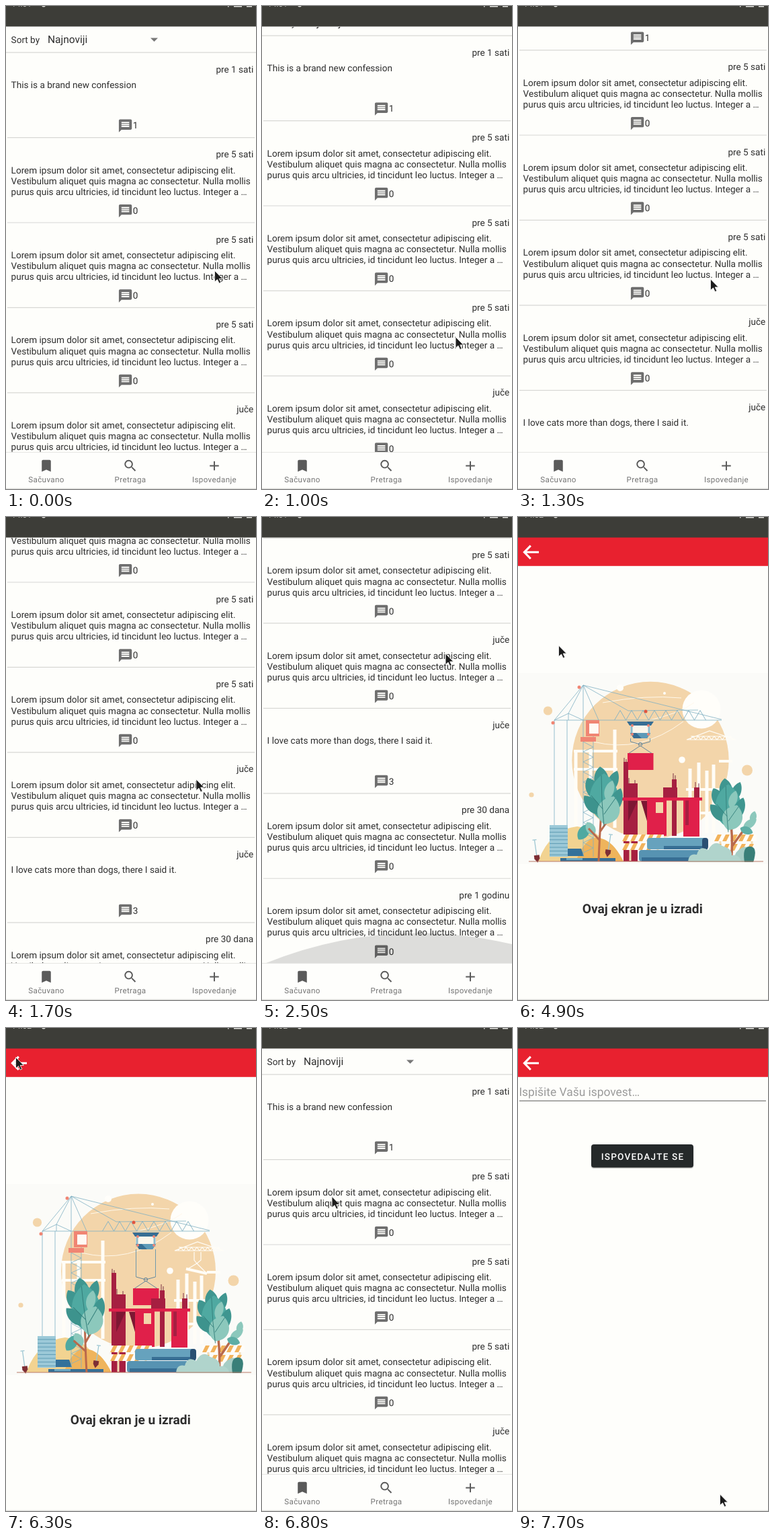
These frames come from a looping animation (372x718 px, 8000 ms). An HTML page:

```html
<!DOCTYPE html>
<html lang="sr">
<head>
<meta charset="utf-8">
<title>Ispovesti</title>
<style>
  html, body { margin: 0; width: 100%; height: 100%; overflow: hidden; background: #fefefb; }
  svg { display: block; width: 100vw; height: 100vh; }
  text { font-family: Roboto, sans-serif; font-size: 13.57px; fill: #2e2e2e; text-rendering: geometricPrecision; }
  .nav text { font-size: 11.58px; letter-spacing: .39px; fill: #747474; }
</style>
</head>
<body>
<svg id="stage" viewBox="0 0 372 718" xmlns="http://www.w3.org/2000/svg"></svg>
<script>
const LOOP = 8000, STEP = 100, PITCH = 126.45;

// ---------- drawing helpers ----------
const rect = (x, y, w, h, fill, more = '') =>
  `<rect x="${x}" y="${y}" width="${w}" height="${h}" fill="${fill}" ${more}/>`;
const disc = (x, y, r, fill, more = '') => `<circle cx="${x}" cy="${y}" r="${r}" fill="${fill}" ${more}/>`;
const shape = (d, fill, more = '') => `<path d="${d}" fill="${fill}" ${more}/>`;
const line = (d, color, w = 1, more = '') =>
  `<path d="${d}" fill="none" stroke="${color}" stroke-width="${w}" ${more}/>`;
const text = (x, y, s, more = '') => `<text x="${x}" y="${y}" ${more}>${s}</text>`;
const icon = (x, y, d, fill) => shape(d, fill, `transform="translate(${x} ${y}) scale(.966)"`);
const group = (id, body, more = '') => `<g id="${id}" ${more}>${body}</g>`;
const times = (n, f) => Array.from({ length: n }, (_, i) => f(i)).join('');

// ---------- list screen ----------
const ICON = {
  message: 'M20 2H4c-1.1 0-2 .9-2 2v18l4-4h14c1.1 0 2-.9 2-2V4c0-1.1-.9-2-2-2zm-2 12H6v-2h12v2zm0-3H6V9h12v2zm0-3H6V6h12v2z',
  saved: 'M17 3H7c-1.1 0-2 .9-2 2v16l7-3 7 3V5c0-1.1-.9-2-2-2z',
  search: 'M15.5 14h-.79l-.28-.27A6.5 6.5 0 1 0 13.73 14.43l.27.28v.79l5 4.99L20.49 19zm-6 0a4.5 4.5 0 1 1 0-9 4.5 4.5 0 0 1 0 9z',
  add: 'M19 13h-6v6h-2v-6H5v-2h6V5h2v6h6v2z'
};
const LOREM = [
  'Lorem ipsum dolor sit amet, consectetur adipiscing elit.',
  'Vestibulum aliquet quis magna ac consectetur. Nulla mollis',
  'purus quis arcu ultricies, id tincidunt leo luctus. Integer a …'
];
const POSTS = [
  ['pre 1 sati', 1, ['This is a brand new confession']],
  ['pre 5 sati', 0, LOREM], ['pre 5 sati', 0, LOREM], ['pre 5 sati', 0, LOREM],
  ['juče', 0, LOREM],
  ['juče', 3, ['I love cats more than dogs, there I said it.']],
  ['pre 30 dana', 0, LOREM], ['pre 1 godinu', 0, LOREM]
];

const card = ([when, count, lines], i) =>
  `<g transform="translate(0 ${69.1 + i * PITCH})">` +
  text(368.2, 29.6, when, 'text-anchor="end"') +
  lines.map((s, n) => text(7.6, 53 + n * 16.1, s)).join('') +
  icon(166, 97.4, ICON.message, '#6e6e6e') + text(188.8, 113.4, count) +
  line(`M2 ${PITCH}H370`, '#d8d8d5', 1.2) + '</g>';

const tab = (x, name, label) =>
  icon(x - 11.6, 671.9, ICON[name], '#5a5a5a') + text(x, 708.3, label, 'text-anchor="middle"');

const listScreen = () =>
  `<g clip-path="url(#view)">` +
  group('scroll',
    text(7.6, 55, 'Sort by') +
    text(62, 55.4, 'Najnoviji', 'style="font-size:15.5px"') +
    shape('M215 47.5h11l-5.5 5.5z', '#777') +
    line('M0 69.2H372', '#d8d8d5', 1.2) +
    group('cards', POSTS.map(card).join(''))) +
  group('glow', shape('M5 663.5A597 597 0 0 1 459.6 663.5Z', '#000', 'opacity=".13"')) + '</g>' +
  `<g class="nav">` + rect(0, 663, 372, 54, '#fefefc') + line('M0 663.5H372', '#e6e6e3') +
  tab(60, 'saved', 'Sačuvano') + tab(185, 'search', 'Pretraga') + tab(310, 'add', 'Ispovedanje') + '</g>';

// ---------- construction picture ----------
const INK = '#7fb0c3', SAND = '#f3d5aa', RED = '#e0204a', DARK = '#a61f41', CORAL = '#f08573';

const zigzag = (x, top, bottom, step, n) =>
  `M${x} ${bottom}` + times(n, i => `L${x + (i + .5) * step} ${top}L${x + (i + 1) * step} ${bottom}`);

const leaf = (x, y, rx, ry, turn, fill) =>
  shape(`M0 ${-ry}C${rx * 1.3} ${-ry * .5} ${rx * 1.3} ${ry * .6} 0 ${ry}C${-rx * 1.3} ${ry * .6} ${-rx * 1.3} ${-ry * .5} 0 ${-ry}Z`,
    fill, `transform="translate(${x} ${y}) rotate(${turn})"`);

// crown centred on 0,0
const crown = (x, y, s) => `<g transform="translate(${x} ${y}) scale(${s})">` +
  leaf(-3, -24, 11, 19, -6, '#3f9690') + leaf(14, -20, 8, 18, 22, '#3f9690') +
  leaf(-16, -10, 10, 18, -25, '#3f9690') + leaf(1, 3, 22, 36, 0, '#4fa9a1') +
  leaf(-17, 14, 9, 18, -40, '#3d938d') + leaf(19, 8, 9, 20, 20, '#3f9690') +
  leaf(8, 22, 17, 22, 20, '#8cc8bc') + leaf(9, -8, 7, 15, 18, '#8cc8bc') +
  line('M-3-30Q-3 10 1 46M1 28L18 4M-1 20L-18 0', '#347f7b', 1) + '</g>';

const barrier = (x, y, w) => rect(x, y, w, 10, '#fffdf8') +
  times(Math.floor(w / 12), i => shape(`M${x + 5 + i * 12} ${y}h6l-5 10h-6z`, '#f2b35c'));

const shovel = (x, y, tilt) => `<g transform="translate(${x} ${y}) rotate(${tilt})">` +
  line('M0 0V24M-3 0H3', '#9cc6d2', 1.3) + shape('M-4 23h8v5l-4 6-4-6z', '#7e2f35') + '</g>';

const backdrop = () =>
  group('sun', disc(0, 0, 1, SAND)) +
  disc(273, 286, 28.5, '#fffefa') +
  group('dots', [SAND, SAND, SAND, '#fffefa'].map(c => disc(0, 0, 1, c)).join('')) +
  disc(152, 254, 5, '#fffefa') + disc(218, 262, 2, '#fffefa') +
  line('M126 276Q190 264 243 269M196 302Q240 292 262 276M112 334Q182 352 246 304', '#fff8ea', 1) +
  line('M86 347V460M144 316V462M108 345V440', '#fffdf7', 5) +
  line('M83 348H148M83 375H148', '#fffdf7', 4) +
  line('M256 374V470M269 365V470M281 377V470M291 368V470', '#fffdf7', 5) +
  line('M250 405H305M252 440H308', '#fffdf7', 4) + rect(299, 361, 20, 4, '#fffdf7') +
  line('M251 331L285 318L324 331H251M257 326H312' + zigzag(256, 326, 331, 8, 8), '#fffdf7', 1.2) +
  group('sideLoad', line('M280 333V345L284 350M290 333V345L284 350M284 350L269 359M284 350L298 364', '#fffdf7', 1.2) +
    line('M268 358L299 365', '#fffdf7', 4));

const crane = () =>
  line('M54 302V458M73 302V458', INK, .8) +
  line('M97 250V505M112 302V505M97 250L54 302H303M97 250L75 292L54 302M75 292L97 302' +
       'M97 250L303 301M97 250L164 288L268 287M97 250L120 302M75 292V302', INK, .8) +
  line(zigzag(143.5, 287.5, 302, 17, 8), INK, .9) +
  line('M97 334' + times(11, i => `L112 ${342 + i * 15}L97 ${349 + i * 15}`), INK, .8) +
  rect(101, 302, 20, 24, CORAL) + rect(106, 307, 14, 15, '#fffaf4') + rect(93, 327, 23, 7, CORAL) +
  disc(91, 253, 2.5, CORAL) + disc(52, 306, 2.5, CORAL) + disc(190, 289, 2.5, '#e0543f');

const trolley = () =>
  shape('M162 304h40l-4 6h-32z', '#376e94') + rect(167, 310, 30, 12, '#fbf6ec') +
  line('M169 310V325M195 310V325', '#8dbccc', 3) +
  shape('M167 321h30l-5 8h-20z', '#376e94') + shape('M176 321h21l-5 8h-8z', '#5e9ab8') +
  [[170, 310], [194, 310], [170, 323], [194, 323]].map(p => disc(...p, 2, CORAL)).join('');

const cargo = () =>
  disc(182, 338, 2.7, 'none', 'stroke="#66869a"') +
  line('M167.5 334L182 338L196.5 334M182 340L164 352M182 340L200 352', '#66869a') +
  rect(163, 351, 38.5, 25, RED);

const building = () =>
  line('M158 358V366M161 360V366M165 388V397M174 391V397M231 381V392M234 384V392M264 394V404M269 396V404', '#7d3045', 1) +
  rect(157, 364, 7, 148, DARK) + rect(163, 396, 15, 116, DARK) +
  rect(216, 402, 21, 15, DARK) + rect(229, 390, 7, 84, DARK) + rect(262, 402, 8, 18, DARK) +
  rect(192, 420, 29, 54, RED) + rect(205, 424, 11, 16, SAND) +
  rect(246, 420, 24, 55, RED) + rect(249, 420, 5, 38, DARK) +
  rect(153, 417, 121, 4.5, RED) +
  shape('M164 422h14l-14 30zM183 422h9v30z', '#7d1733');

const groundBack = () =>
  shape('M30 512Q48 464 88 460Q128 464 142 512Z', '#f2d391') +
  shape('M86 512Q102 470 124 478Q142 482 157 512Z', '#efb45c') +
  rect(47, 458, 27, 47, '#9cc9d8') +
  line(times(8, i => `M47 ${463 + i * 5.6}h27`), '#5f9cb4', 1) +
  shape('M74 493h20l4 11H74z', '#34719a');

const groundFront = () =>
  rect(63, 507, 82, 5, '#376e94') + rect(72, 507, 24, 3, '#6da8c2') +
  shovel(24.5, 480, -8) + shovel(138, 472, 9) +
  line('M167 482V511M208 482V497M301 472V510M348 472V500', '#f2dcb4', 3) +
  barrier(155, 472, 62) + barrier(155, 485, 50) + barrier(292, 472, 63) + barrier(292, 486, 60) +
  rect(192, 477, 90, 17, '#66a2bd', 'rx="4"') + rect(217, 489, 65, 5, '#376e94') +
  rect(180, 495, 92, 17, '#5793b2', 'rx="4"') + rect(184, 506, 88, 6, '#376e94') +
  rect(274, 477, 9, 17, '#2a4f73', 'rx="4"');

const bushes = () =>
  shape('M322 513Q320 498 333 492Q343 486 347 500Q354 506 350 513Z', '#a6cdc5') +
  shape('M337 513Q333 488 347 490Q357 492 350 513Z', '#397f78') +
  shape('M253 513Q254 499 266 502Q270 487 283 495Q292 478 304 489Q319 493 318 503Q328 500 333 513Z', '#b0d4cc') +
  line('M16 512H365', '#b97a68', 1);

const picture = () => group('art',
  rect(0, 232, 372, 284, '#fbfbf8') + backdrop() + groundBack() + crane() +
  group('ropes', line('M167.5 0V1M196.5 0V1', '#6f99ad', 1, 'vector-effect="non-scaling-stroke"')) +
  group('cargo', cargo()) + group('trolley', trolley()) + building() + groundFront() +
  leaf(98, 468, 8, 14, 35, '#4fa9a1') + leaf(108, 463, 7, 11, -30, '#8cc8bc') +
  group('treeA', line('M120 512Q121 480 124 438M121 480L105 463M122 468L136 448', '#b9694c', 3) + crown(127, 414, 1)) +
  group('treeB', line('M317 512Q321 478 314 430M318 490L342 457', '#b9694c', 3.5) + crown(312, 427, .9) +
    leaf(345, 456, 6, 12, 55, '#8cc8bc') + leaf(340, 466, 6, 10, 110, '#5eaea5') + leaf(350, 446, 5, 9, 15, '#8cc8bc')) +
  bushes());

// ---------- other screens ----------
const header = rect(0, 30, 372, 42.8, '#e8212f') +
  line('M18.8 42.6L9.4 52.3L18.8 62M10 52.3H31', '#fff', 3.1);

const workScreen = () => header + picture() +
  text(185.2, 589, 'Ovaj ekran je u izradi', 'text-anchor="middle" style="font-size:19.15px;font-weight:700"');

const formScreen = () => header +
  text(1.4, 101, 'Ispišite Vašu ispovest…', 'style="font-size:17.4px;fill:#9b9b9b"') +
  line('M2 108.3H369', '#5c5c5a') +
  rect(108.6, 174.4, 152.8, 34.6, '#000', 'rx="4" opacity=".16"') +
  rect(109, 173, 152, 34.5, '#25292a', 'rx="4"') +
  text(185.6, 195.5, 'ISPOVEDAJTE SE',
    'text-anchor="middle" style="font-weight:500;letter-spacing:1.2px;fill:#fff"');

const statusBar = rect(0, 0, 372, 30.5, '#3d3d38') +
  text(8, 1.2, '', 'id="clock" style="font-size:12px;fill:#c9c9c4"') +
  disc(56, -1.5, 3, '#dededa') + rect(330, 0, 1.5, 1.5, '#dededa') +
  rect(339, 0, 12, 1.5, '#dededa') + rect(358, 0, 8, 1.5, '#dededa');

document.getElementById('stage').innerHTML =
  '<defs><clipPath id="view"><rect y="31" width="372" height="632"/></clipPath></defs>' +
  rect(0, 0, 372, 718, '#fefefb') +
  group('list', listScreen()) + group('work', workScreen()) + group('form', formScreen()) +
  line('M0 717.3H372', '#d9d9d6') + statusBar +
  group('cursor', shape('M0 0V16.5L4 13L6.7 18.7L9.3 17.5L6.7 12H11.8Z', '#1c1c1c',
    'stroke="#f4f4f2" stroke-width=".9"'));

// ---------- motion ----------
const POINTER = [
  [100, 310.5, 393.5], [500, 297.5, 458], [600, 297.5, 458], [800, 288.5, 520.5], [900, 288.5, 520.5],
  [1300, 286.5, 406], [1500, 283, 340], [1800, 283, 415], [2000, 281, 400], [2500, 273, 203],
  [2700, 192, 563], [2900, 112, 662], [3100, 82, 699], [3200, 82, 699], [3300, 66, 699],
  [3400, 76, 697], [3500, 76, 697], [3600, 70, 693], [3900, 70, 693], [4800, 64, 503],
  [4900, 60.5, 191], [5500, 14.5, 43.5], [6600, 14.5, 43.5], [7200, 283, 664.5],
  [7300, 283, 664.5], [7500, 300.5, 693]
];
const SCROLL = [[900, 0], [1000, 25], [1300, 130], [1500, 195], [1800, 240], [2000, 275], [2400, 417]];
const GLOW = [[2300, 0], [2500, 1], [2700, .8], [3100, 0]];
const TROLLEY = [[4000, -14], [4900, 0], [5600, 26]];
const DROP = [[4900, 0], [6300, 36], [6600, 38]];

function at(keys, t) {
  const i = keys.findIndex(k => k[0] > t);
  if (i === 0) return keys[0].slice(1);
  if (i < 0) return keys[keys.length - 1].slice(1);
  const a = keys[i - 1], b = keys[i], p = (t - a[0]) / (b[0] - a[0]);
  return a.slice(1).map((v, n) => v + (b[n + 1] - v) * p);
}

const el = id => document.getElementById(id);
const move = (node, value) => node.setAttribute('transform', value);
const show = (id, on) => { el(id).style.display = on ? '' : 'none'; };

function drawPicture(t) {
  const k = (1 + Math.cos((t - 4900) / 1400 * Math.PI)) / 2;
  const [x] = at(TROLLEY, t), [drop] = at(DROP, t);
  move(el('sun'), `translate(197 361.5) scale(${115 + 1.7 * k})`);
  const spots = [[46.5 - 2 * k, 289 - k, 6.6], [22 - 2 * k, 412 + k, 3.6], [338.5 + 2.5 * k, 375.5 + k, 8], [244, 361, 4.8]];
  spots.forEach(([cx, cy, r], i) => move(el('dots').children[i], `translate(${cx} ${cy}) scale(${r})`));
  move(el('sideLoad'), `translate(0 ${-26 * k})`);
  el('sideLoad').style.opacity = 1 - k;
  move(el('trolley'), `translate(${x} 0)`);
  move(el('cargo'), `translate(${x} ${drop})`);
  move(el('ropes'), `translate(${x} 329) scale(1 ${5 + drop})`);
  move(el('treeA'), `rotate(${-5.2 * (1 - k)} 120 512)`);
  move(el('treeB'), `rotate(${-1.8 * (1 - k)} 317 512)`);
}

function draw(t) {
  const form = t >= 7700, work = t >= 3800 && t < 6600, back = t >= 6600;
  show('form', form);
  show('work', work);
  show('list', !form && !work);
  show('art', t >= 4000);
  show('cards', t < 6600 || t >= 6700);
  move(el('scroll'), `translate(0 ${back ? 0 : -at(SCROLL, t)[0]})`);
  const [g] = at(GLOW, t);
  move(el('glow'), `translate(0 ${663.5 * (1 - g)}) scale(1 ${g})`);
  el('clock').textContent = t < 4400 ? '14:01' : '14:02';
  if (work) drawPicture(t);
  move(el('cursor'), `translate(${at(POINTER, t).join(' ')})`);
}

const start = performance.now();
function tick() {
  const t = (performance.now() - start) % LOOP;
  draw(Math.floor(t / STEP) * STEP);
  requestAnimationFrame(tick);
}
tick();
</script>
</body>
</html>
```
